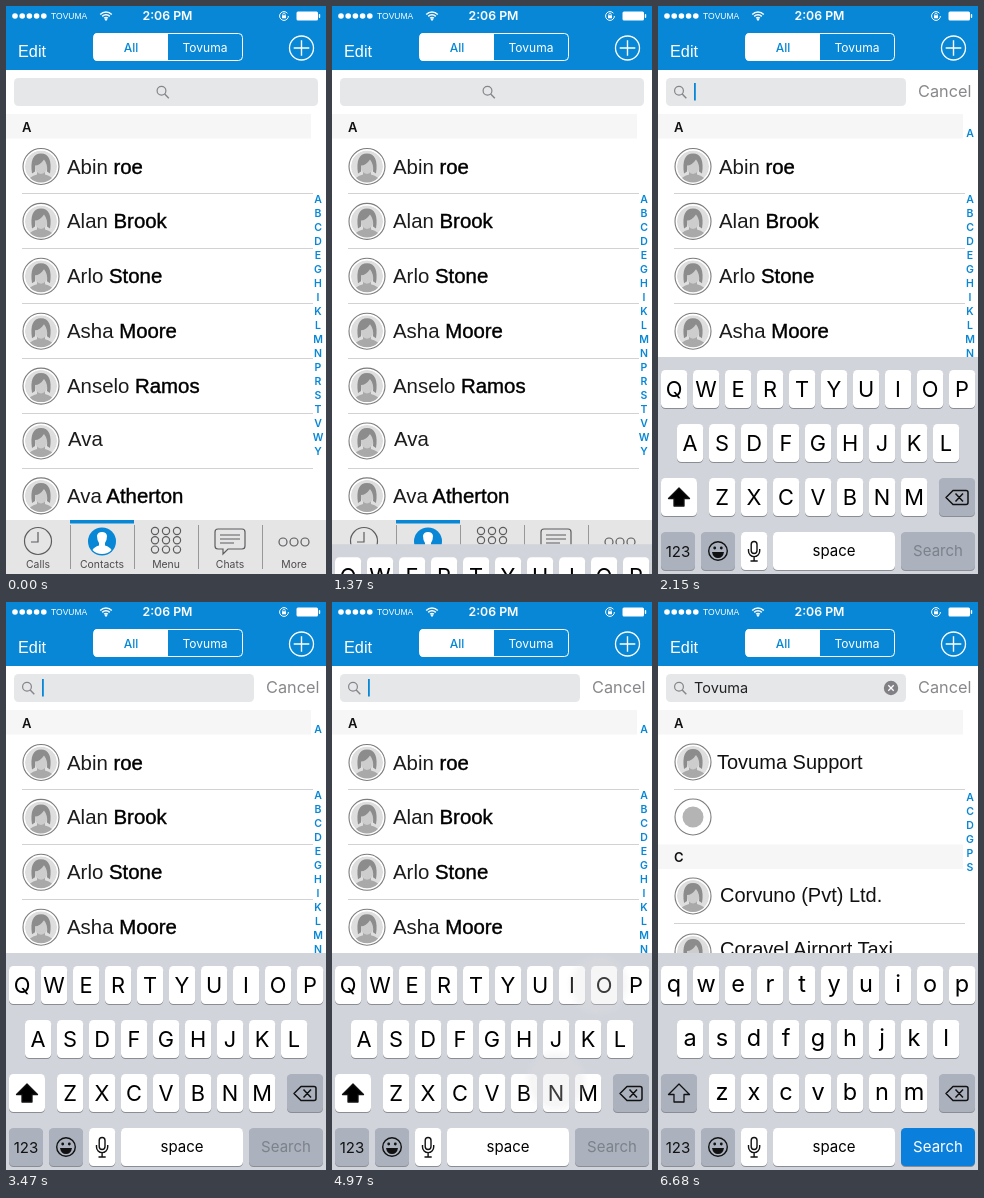
Animation of 320x568 px, one loop 8 s. Source, as an HTML page:

```html
<!DOCTYPE html>
<html lang="en">
<head>
<meta charset="utf-8">
<title>Contact search</title>
<style>
html, body { margin: 0; width: 100%; height: 100%; overflow: hidden; background: #fff; }
svg { display: block; width: 100vw; height: 100vh; }
text { font-family: Inter, Roboto, sans-serif; }
.h { font-family: "Liberation Sans", Arial, sans-serif; }
</style>
</head>
<body>
<svg id="stage" viewBox="0 0 320 568"></svg>
<script>
const BLUE = '#0787d6', BRAND = 'Tovuma';

const rect = (x, y, w, h, fill, r = 0, more = '') =>
  `<rect x="${x}" y="${y}" width="${w}" height="${h}" rx="${r}" fill="${fill}" ${more}/>`;
const circle = (x, y, r, fill, more = '') =>
  `<circle cx="${x}" cy="${y}" r="${r}" fill="${fill}" ${more}/>`;
const line = (d, stroke, w = 1, more = '') =>
  `<path d="${d}" fill="none" stroke="${stroke}" stroke-width="${w}" ${more}/>`;
const text = (s, x, y, size, fill = '#000', more = '') =>
  `<text x="${x}" y="${y}" font-size="${size}" fill="${fill}" ${more}>${s}</text>`;
const mid = 'text-anchor="middle"', helv = 'class="h"';
const group = (id, body, more = '') => `<g id="${id}" ${more}>${body}</g>`;

const defs = `<defs>
  <clipPath id="disc"><circle r="16"/></clipPath>
  <radialGradient id="soft">
    <stop offset=".75" stop-color="#e0e1e2"/>
    <stop offset="1" stop-color="#e0e1e2" stop-opacity="0"/>
  </radialGradient>
  <g id="face">
    <circle r="18" fill="#fff" stroke="#7d7d7d" stroke-width="1.1"/>
    <g clip-path="url(#disc)">
      <circle r="16" fill="#dedede"/>
      <path d="M-14 18Q-13 10 -4 8V3H4V8Q13 10 14 18Z" fill="#a9a9a9"/>
      <ellipse cy="-1" rx="6.5" ry="8.5" fill="#cdcdcd"/>
      <path d="M-9 7C-11 -6 -8 -13 0 -13S11 -6 9 7L6 5Q7 -2 3 -7Q-1 -1 -6 -1L-6 5Z" fill="#8c8c8c"/>
    </g>
  </g>
</defs>`;

const face = y => `<use href="#face" x="35" y="${y}"/>`;
const rule = y => line(`M16 ${y}H307`, '#d2d2d4');
const strip = (s, y) => rect(0, y, 305, 24.5, '#f6f6f7') +
  text(s, 16, y + 17.5, 13, '#111', 'font-weight="600"');
const letter = (s, y) => text(s, 312, y + 3.8, 10.5, BLUE, `${mid} font-weight="600"`);
const index = (s, y) => [...s].map((c, i) => letter(c, y + i * 14)).join('');

function header() {
  let s = rect(0, 0, 320, 64, BLUE);
  for (let i = 0; i < 5; i++) s += circle(9 + i * 7.2, 10, 2.8, '#fff');
  s += text(BRAND.toUpperCase(), 45, 13.4, 8.5, '#fff', helv);
  for (const r of [2.5, 5.2, 8])
    s += line(`M${100 - r * .72} ${14 - r * .7}A${r} ${r} 0 0 1 ${100 + r * .72} ${14 - r * .7}`, '#fff', 1.5);
  s += circle(100, 13.4, 1.2, '#fff');
  s += text('2:06 PM', 161.5, 14.4, 12.3, '#fff', `${mid} font-weight="600"`);
  s += circle(278, 10, 4.4, 'none', 'stroke="#fff" stroke-dasharray="24 3.6"');
  s += rect(276, 9.3, 4, 3, '#fff') + line('M276.8 9.5V8.4A1.2 1.2 0 0 1 279.2 8.4V9.5', '#fff', .8);
  s += rect(290.5, 5.5, 21.5, 9, '#fff', 1.5) + rect(312.8, 8, 1.4, 4, '#fff', .7);
  s += text('Edit', 12, 50.5, 16.3, '#fff', helv);
  s += rect(87.5, 27.5, 149, 27, 'none', 4, 'stroke="#fff"');
  s += '<path d="M162 27H91.500A4 4 0 0 0 87.500 31V51A4 4 0 0 0 91.500 55H162Z" fill="#fff"/>';
  s += text('All', 125, 45.6, 12, BLUE, `${mid} font-weight="500"`);
  s += text(BRAND, 199, 45.6, 12, '#fff', mid);
  s += circle(295.5, 42, 12, 'none', 'stroke="#fff" stroke-width="1.3"');
  return s + line('M287.700 42H303.300M295.500 34.200V49.800', '#fff', 1.4);
}

const glass = (x, y) => circle(x - 1, y - 1.2, 4.4, 'none', 'stroke="#85858a" stroke-width="1.2"') +
  line(`M${x + 2.2} ${y + 2}L${x + 6.3} ${y + 6.2}`, '#85858a', 1.4);
const field = w => rect(0, 64, 320, 43.5, '#fff') + rect(8, 72, w, 28, '#e6e7e9', 4.5);
const cancel = text('Cancel', 260, 91.300, 16.3, '#88888c');

function contacts() {
  const people = ['Abin roe', 'Alan Brook', 'Arlo Stone', 'Asha Moore', 'Anselo Ramos', 'Ava', 'Ava Atherton'];
  let s = strip('A', 108);
  people.forEach((p, i) => {
    const [first, last] = p.split(' '), y = 160.5 + i * 54.9;
    s += face(y) + text(first + (last ? ` <tspan fill="#000" stroke="#000" stroke-width=".4">${last}</tspan>` : ''),
      last ? 61 : 62, y + (last ? 7 : 5), 20.4, '#1c1c1c', helv);
    if (i < 6) s += rule(187.5 + i * 55);
  });
  return s + index('ABCDEGHIKLMNPRSTVWY', 193);
}

function tabs() {
  const gray = '#5d5d60', ring = `stroke="${gray}" stroke-width="1.2"`;
  let s = rect(0, 514, 320, 54, '#e5e5e6') + rect(64, 514, 64, 3.5, BLUE);
  for (const x of [64, 128, 192, 256]) s += line(`M${x}.5 519V563`, '#98989b');
  s += circle(32, 535, 13.5, 'none', ring) + line('M32 526V536H25', gray, 1.2);
  s += circle(96, 535.5, 14, BLUE);
  s += '<path d="M86.500 544Q88 541 93 539.500V537Q91 534 91 530Q91.500 526 96 526T101 530Q101 534 99 537V539.500Q104 541 105.500 544Q102 548 96 548T86.500 544Z" fill="#fff"/>';
  for (let i = 0; i < 9; i++)
    s += circle(149 + i % 3 * 11, 525 + Math.floor(i / 3) * 9.3, 3.6, 'none', ring);
  s += circle(160, 549.5, 3, 'none', ring).repeat(0);
  s += line('M212 523H236Q239 523 239 526V540Q239 543 236 543H222L217 548V543H212Q209 543 209 540V526Q209 523 212 523Z', gray, 1.2);
  s += line('M214 529H234M214 533H234M214 537H228', gray, 1.1);
  for (const x of [277, 288, 299]) s += circle(x, 536, 4, 'none', ring);
  ['Calls', 'Contacts', 'Menu', 'Chats', 'More'].forEach((n, i) => {
    s += text(n, 32 + i * 64, 561.5, 10.4, '#4c4c4f', mid);
  });
  return s;
}

function results() {
  const name = (s, x, y) => text(s, x, y, 20, '#111', helv);
  return rect(0, 64, 320, 290, '#fff') + field(240) + glass(22, 86) + cancel +
    text(BRAND, 36, 91.300, 14.5, '#222') +
    circle(233, 86, 7.2, '#808085') + line('M230.300 83.300L235.700 88.700M235.700 83.300L230.300 88.700', '#fff', 1.3) +
    strip('A', 108) + face(160) + name(BRAND + ' Support', 59, 167) + rule(187.5) +
    circle(35, 215, 18, '#fff', 'stroke="#7d7d7d" stroke-width="1.1"') + circle(35, 215, 10.5, '#b4b4b4') +
    strip('C', 242.5) + face(294) + name('Corvuno (Pvt) Ltd.', 62, 299.5) + rule(321.5) +
    face(350) + name('Coravel Airport Taxi', 62, 354) + index('ACDGPS', 195);
}

function keyboard(upper) {
  const dark = '#abb2bd';
  const key = (x, y, w, fill = '#fff') => rect(x, y + 1, w, 38, '#8a8d93', 4.5) + rect(x, y, w, 38, fill, 4.5);
  let s = rect(0, 351, 320, 217, '#d1d4db');
  [['QWERTYUIOP', 3, 364], ['ASDFGHJKL', 19, 418], ['ZXCVBNM', 51, 472]].forEach(([row, x, y]) => {
    [...row].forEach((c, i) => {
      s += key(x + i * 32, y, 26.3) + text(upper ? c : c.toLowerCase(), x + i * 32 + 13,
        y + (upper ? 26.8 : 26), upper ? 21.8 : 23.5, '#000', mid);
    });
  });
  s += key(3, 472, 36, upper ? '#fff' : dark) +
    `<path d="M21 482L31.500 492.500H26V500H16V492.500H10.500Z" fill="${upper ? '#000' : 'none'}" stroke="#111" stroke-width="1.3" stroke-linejoin="round"/>`;
  s += key(281, 472, 36, dark) +
    line('M288 491.500L295 484.500H308Q310 484.500 310 486.500V496.500Q310 498.500 308 498.500H295ZM297.500 487.500L305 495.500M305 487.500L297.500 495.500', '#111', 1.5, 'stroke-linejoin="round"');
  s += key(3, 526, 34, dark) + text('123', 20, 550.500, 15, '#111', mid);
  s += key(43, 526, 34, dark) + circle(60, 545, 9.3, 'none', 'stroke="#111" stroke-width="1.4"') +
    circle(56.7, 542, 1.4, '#111') + circle(63.3, 542, 1.4, '#111') +
    '<path d="M54 546H66Q65 552 60 552T54 546Z" fill="#111"/>';
  s += key(83, 526, 26.3) + rect(93.2, 535.5, 5.8, 12, 'none', 2.9, 'stroke="#111" stroke-width="1.4"') +
    line('M90.500 543V545A5.600 5.600 0 0 0 101.700 545V543M96.100 550.500V555M92.500 555H99.700', '#111', 1.4);
  s += key(115, 526, 122) + text('space', 176, 550, 15, '#000', mid);
  s += key(243, 526, 74, upper ? dark : '#0a7fdc') + text('Search', 280, 550, 15, upper ? '#7c818a' : '#fff', mid);
  return s;
}

// start, end, touch points
const taps = [
  [500, 1130, [160, 83.5]],
  [3470, 4250, [160, 479], [240, 383]],
  [4280, 5060, [224, 479], [267, 383]],
  [5090, 5870, [143, 384], [273, 466]],
  [5900, 6680, [36, 437]]
];

const stage = document.getElementById('stage');
stage.innerHTML = defs + rect(0, 0, 320, 568, '#fff') + contacts() + tabs() + header() +
  field(304) + glass(156.5, 86) +
  group('active', field(240) + glass(22, 86) + rect(36, 77, 1.8, 17.5, BLUE) + cancel + letter('A', 127)) +
  group('results', results()) + group('upper', keyboard(true)) + group('lower', keyboard(false)) +
  taps.map(([, , ...points], i) =>
    group('tap' + i, points.map(([x, y]) => circle(x, y, 33, 'url(#soft)')).join(''))).join('');

const LOOP = 8000, STEP = 30;
const clamp = v => Math.max(0, Math.min(1, v));
const part = id => document.getElementById(id);
const show = (id, alpha) => {
  part(id).setAttribute('opacity', alpha);
  part(id).setAttribute('visibility', alpha > 0 ? 'visible' : 'hidden');
};

function draw(now) {
  const t = Math.floor((now % LOOP - 20) / STEP) * STEP + 20;
  const found = t >= 6680;
  show('active', clamp((t - 1970) / 180));
  show('results', +found);
  show('lower', +found);
  show('upper', +(t >= 1370 && !found));
  part('upper').setAttribute('transform', `translate(0 ${Math.max(0, (1550 - t) * 1.04)})`);
  taps.forEach(([from, to], i) => {
    show('tap' + i, t > from && t < to ? .75 * Math.sin(Math.PI * (t - from) / (to - from)) : 0);
  });
}

const start = performance.now();
function tick() {
  draw(performance.now() - start);
  requestAnimationFrame(tick);
}
tick();
</script>
</body>
</html>
```
